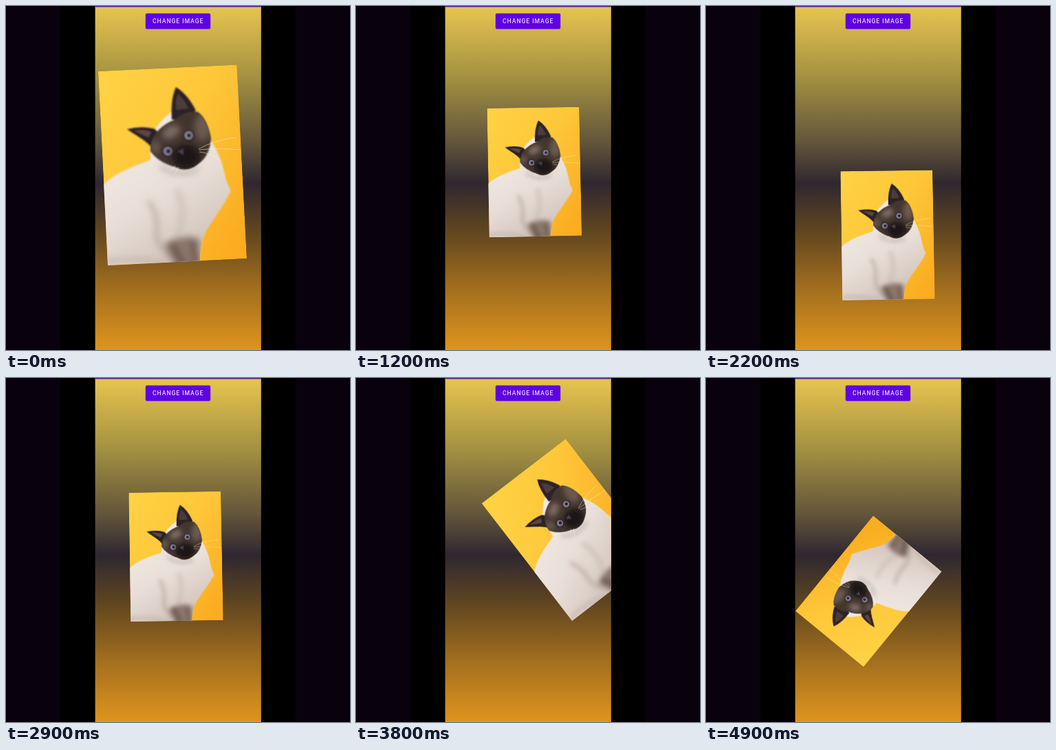
Animation, 500 px wide and 500 px high, one loop 5000 ms. Source, as an HTML page:

```html
<!DOCTYPE html>
<html lang="en">
<head>
<meta charset="utf-8">
<title>Drag, pinch and rotate</title>
<style>
  html, body { margin: 0; width: 100%; height: 100%; overflow: hidden; background: #000; }
  svg { display: block; width: 100vw; height: 100vh; }
  text { font: 500 8.7px Roboto, sans-serif; letter-spacing: .9px; fill: #e9d8fc; }
</style>
</head>
<body>
<svg viewBox="0 0 500 500">
  <defs>
    <linearGradient id="screen" x2="0" y2="1">
      <stop offset="0" stop-color="#e8c550"/>
      <stop offset=".2" stop-color="#a59341"/>
      <stop offset=".4" stop-color="#61543a"/>
      <stop offset=".515" stop-color="#2f2730"/>
      <stop offset=".66" stop-color="#62471f"/>
      <stop offset=".82" stop-color="#a26e1f"/>
      <stop offset="1" stop-color="#df951d"/>
    </linearGradient>
    <linearGradient id="wall" x2="1" y2=".8">
      <stop offset="0" stop-color="#ffd345"/>
      <stop offset=".5" stop-color="#fec73a"/>
      <stop offset="1" stop-color="#fbac20"/>
    </linearGradient>
    <linearGradient id="fur" x2=".5" y2="1">
      <stop offset="0" stop-color="#f4eeea"/>
      <stop offset=".6" stop-color="#e9dfd8"/>
      <stop offset="1" stop-color="#d2c4bb"/>
    </linearGradient>
    <filter id="soft" x="-50%" y="-50%" width="200%" height="200%"><feGaussianBlur stdDeviation="5"/></filter>
    <filter id="fuzz" x="-20%" y="-20%" width="140%" height="140%"><feGaussianBlur stdDeviation=".9"/></filter>
    <clipPath id="phone"><rect x="129.600" width="241.200" height="500"/></clipPath>
    <clipPath id="frame"><path id="edge" d="M134 95 335.500 85.500 350 367 148 377z"/></clipPath>
    <clipPath id="coat"><path id="body" d="M140 262C152 247 178 235 210 224L210 190Q222 168 240 154L294 190C305 204 314 225 318 245Q321 258 327 268C319 287 299 312 288 333Q281 350 282 375L140 380z"/></clipPath>
    <clipPath id="face"><path id="head" d="M210 203Q213 188 222 180Q232 170 246 165Q260 151 279 154Q293 165 298 193Q296 218 280 229Q264 243 246 234Q222 228 210 211z"/></clipPath>
  </defs>

  <rect width="500" height="500" fill="#09020c"/>
  <rect x="79" width="342" height="500"/>
  <g clip-path="url(#phone)">
    <rect x="129" width="243" height="500" fill="url(#screen)"/>
    <rect x="129" width="243" height="1.500" fill="#53209a"/>
    <rect x="202.800" y="10.800" width="94.400" height="22.800" rx="2" fill="#5e02e4"/>
    <text x="213" y="25.300">CHANGE IMAGE</text>

    <g id="card">
      <g clip-path="url(#frame)">
        <use href="#edge" fill="url(#wall)"/>
        <use href="#body" fill="url(#fur)" filter="url(#fuzz)"/>
        <g clip-path="url(#coat)" filter="url(#fuzz)">
          <g filter="url(#soft)" fill="none" stroke-linecap="round">
            <path d="M209 285Q221 305 219 326T240 366" stroke="#ab9a91" stroke-width="7" opacity=".6"/>
            <path d="M230 346Q255 330 281 338L284 380H246z" fill="#8b786d"/>
            <path d="M242 348 258 376" stroke="#67534a" stroke-width="8"/>
            <path d="M271 345 277 376" stroke="#6d574c" stroke-width="7"/>
            <path d="M226 234Q250 250 278 238" stroke="#b5a9a3" stroke-width="6" opacity=".8"/>
            <path d="M250 270Q262 300 250 334" stroke="#cabcb3" stroke-width="9" opacity=".7"/>
            <path d="M148 371Q190 364 230 374" stroke="#b6a69d" stroke-width="6" opacity=".6"/>
          </g>
        </g>
        <g filter="url(#fuzz)">
          <path d="M212 206C202 194 188 188 176 179Q196 174 214 178Q224 182 219 192z" fill="#2c2224"/>
          <path d="M186 181Q201 179 211 183L207 191Q198 187 186 181z" fill="#5d4443"/>
          <path d="M241 165Q239 135 247 118Q264 128 276 152L262 166z" fill="#2c2326"/>
          <path d="M247 151Q246 136 250 128Q260 136 265 149z" fill="#4d3b3e"/>
          <use href="#head" fill="#43362f"/>
        </g>
        <g clip-path="url(#face)">
          <g filter="url(#soft)">
            <ellipse cx="286" cy="176" rx="12" ry="20" fill="#6a5a4f"/>
            <ellipse cx="240" cy="183" rx="14" ry="9" transform="rotate(-30 240 183)" fill="#7b6a60"/>
            <ellipse cx="217" cy="205" rx="7" ry="10" fill="#6a584f"/>
            <ellipse cx="262" cy="219" rx="21" ry="18" fill="#1d1519"/>
          </g>
          <g filter="url(#fuzz)">
            <circle cx="235" cy="211" r="8.500" fill="#2b2329"/>
            <circle cx="265.500" cy="188" r="8" fill="#2f272b"/>
            <circle cx="235" cy="211" r="6.200" fill="#817d95"/>
            <circle cx="265.500" cy="188" r="6" fill="#8a8594"/>
            <circle cx="236" cy="211" r="3.200" fill="#2b2533"/>
            <circle cx="266" cy="188" r="3.100" fill="#2b2533"/>
            <path d="M249 211 258 207 258 217z" fill="#4a3d50"/>
          </g>
        </g>
        <path d="M280 208Q299 196 334 191M281 209Q305 206 341 209M281 212Q298 214 312 225M246 232 239 241M251 234 245 244"
          fill="none" stroke="#fff0d5" stroke-width=".8" opacity=".65"/>
      </g>
    </g>
  </g>
</svg>
<script>
const LOOP = 5000, STEP = 100;
// time, centre x, centre y, scale, turn in degrees
const keys = [
  [0, 242, 231, 1, 0],
  [1200, 259.3, 241.3, .664, 1.8],
  [1600, 256.5, 145.3, .664, 1.9],
  [2200, 264, 333, .664, 1.9],
  [2900, 247, 259.3, .664, 1.9],
  [3800, 309.5, 220.5, .763, -34.8],
  [4900, 236, 310, .635, -137.9]
];
const card = document.getElementById("card");

const slope = (i, c) => (keys[i + 1][c] - keys[i][c]) / (keys[i + 1][0] - keys[i][0]);

// Tangents that never overshoot: flat at turning points
function tangent(i, c) {
  if (i === 0) return 0;
  if (i === keys.length - 1) return slope(i - 1, c);
  const a = slope(i - 1, c), b = slope(i, c);
  return a * b > 0 ? 2 * a * b / (a + b) : 0;
}

function valueAt(t, c) {
  let i = 0;
  while (i < keys.length - 2 && t >= keys[i + 1][0]) i++;
  const [p, q] = [keys[i], keys[i + 1]];
  const d = q[0] - p[0], u = (t - p[0]) / d, v = 1 - u;
  return v * v * (1 + 2 * u) * p[c] + u * u * (3 - 2 * u) * q[c]
    + d * u * v * (v * tangent(i, c) - u * tangent(i + 1, c));
}

function draw(now) {
  const t = Math.floor(now % LOOP / STEP) * STEP;
  const [x, y, s, r] = [1, 2, 3, 4].map(c => valueAt(t, c));
  card.setAttribute("transform", `translate(${x} ${y}) rotate(${r}) scale(${s}) translate(-242 -231)`);
  requestAnimationFrame(draw);
}
draw(performance.now());
</script>
</body>
</html>
```
